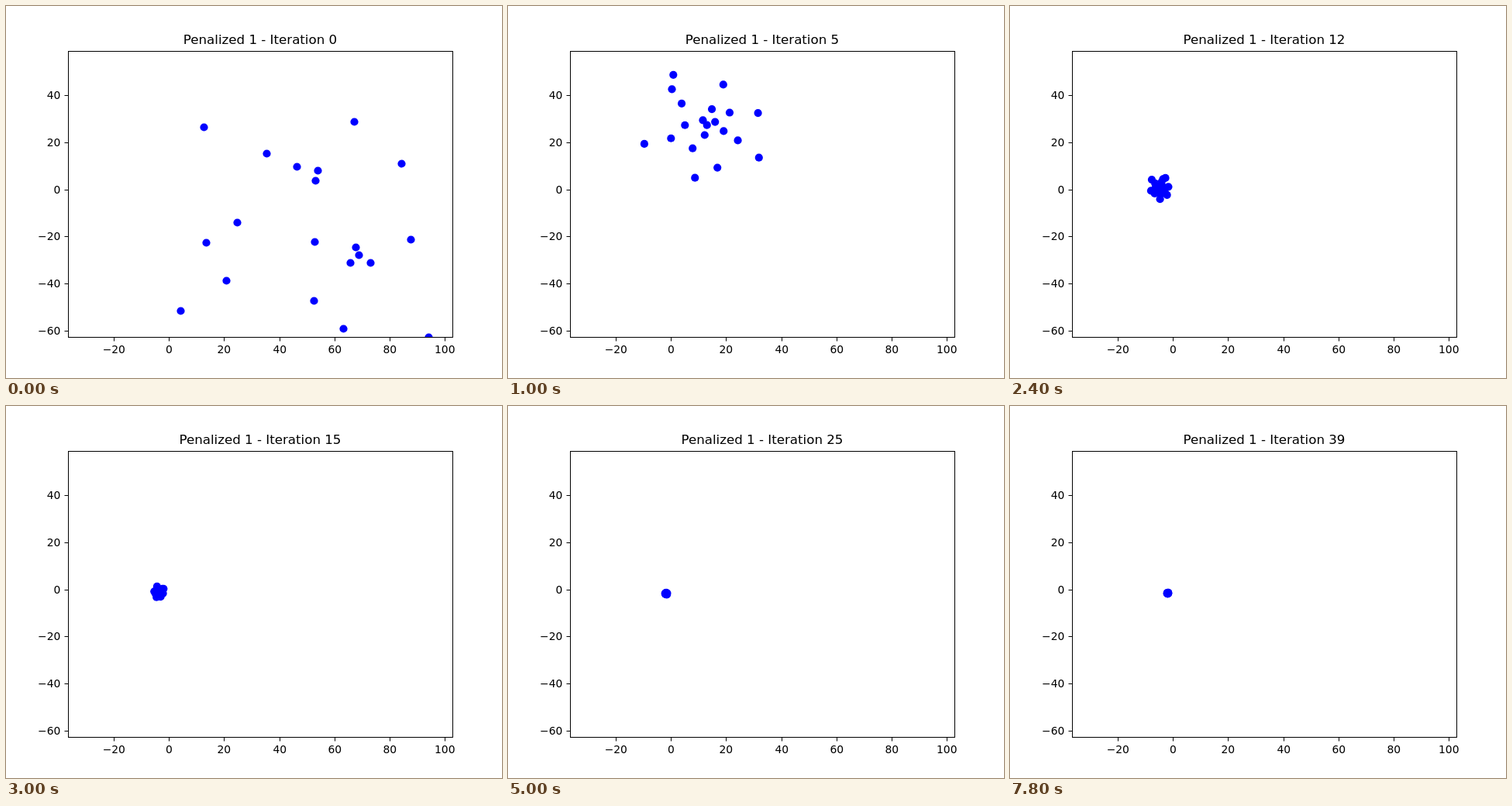
Animation, 640 px wide and 480 px high, one loop 8 s. Source, as an HTML page:

```html
<!DOCTYPE html>
<html lang="en">
<head>
<meta charset="utf-8">
<title>Swarm convergence</title>
<style>
  html, body { margin: 0; width: 100%; height: 100%; overflow: hidden; background: #fff; }
  svg { display: block; width: 640px; height: 480px; }
  text { font-family: "DejaVu Sans", sans-serif; font-size: 13.89px; }
  #title { font-size: 16.67px; text-anchor: middle; }
</style>
</head>
<body>
<svg viewBox="0 0 640 480">
  <clipPath id="area"><rect x="80" y="58" width="496" height="369"/></clipPath>
  <g id="dots" fill="#00f" clip-path="url(#area)"></g>
  <g id="axes" fill="none" stroke="#000"><rect x="80.5" y="58.5" width="496" height="369"/></g>
  <g id="labels"></g>
  <text id="title" x="328" y="49"></text>
</svg>
<script>
const STEP = 200, ITERATIONS = 40, GATHER = 5;

// Where the swarm starts.
const starts = [
  [255,156], [449,149], [336,190], [375,207], [402,212], [399,225], [510,203],
  [298,279], [258,305], [398,304], [451,311], [455,321], [444,331], [470,331],
  [522,301], [284,354], [397,380], [225,393], [435,416], [545,427]
];

// Path of the swarm's centre: iteration, x, y.
const path = [
  [0, 398, 280], [5, 256, 151], [9, 200, 209], [12, 194, 234], [19, 202.5, 241], [39, 203, 241]
];

const create = (parent, name, attrs) => {
  const node = document.createElementNS("http://www.w3.org/2000/svg", name);
  for (const key in attrs) node.setAttribute(key, attrs[key]);
  return document.getElementById(parent).appendChild(node);
};

const label = (value, x, y, anchor) => {
  create("labels", "text", { x, y, "text-anchor": anchor }).textContent =
    String(value).replace("-", "\u2212");
};

for (let value = -20; value <= 100; value += 20) {
  const x = Math.round(210.3 + value * 3.556);
  create("axes", "path", { d: `M${x + .5} 428v4.5` });
  label(value, x + .3, 448, "middle");
}
for (let value = -60; value <= 40; value += 20) {
  const y = Math.round(236.5 - value * 3.042);
  create("axes", "path", { d: `M75.5 ${y + .5}h5` });
  label(value, 70.3, y + 5, "end");
}

const random = seed => {
  const value = Math.sin(seed * 127.1 + 11.7) * 43758.5453;
  return value - Math.floor(value);
};

const dots = starts.map(([x, y], i) => ({
  circle: create("dots", "circle", { r: 5.1 }),
  startX: x - path[0][1],
  startY: y - path[0][2],
  angle: i * 2.4 + random(i),
  radius: (i + .5) / starts.length
}));
const title = document.getElementById("title");

function tangent(k, axis) {
  const before = path[Math.max(k - 1, 0)];
  const after = path[Math.min(k + 1, path.length - 1)];
  return (after[axis] - before[axis]) / (after[0] - before[0]);
}

// Cubic Hermite curve through the path points.
function centre(iteration, axis) {
  let k = path.length - 2;
  while (iteration < path[k][0]) k--;
  const span = path[k + 1][0] - path[k][0];
  const u = (iteration - path[k][0]) / span;
  const v = 1 - u;
  return v * v * (1 + 2 * u) * path[k][axis]
    + u * u * (1 + 2 * v) * path[k + 1][axis]
    + u * v * span * (v * tangent(k, axis) - u * tangent(k + 1, axis));
}

function draw(iteration) {
  title.textContent = `Penalized 1 - Iteration ${iteration}`;
  const x = centre(iteration, 1) + .5;
  const y = centre(iteration, 2) + .5;
  const gathered = Math.min(iteration / GATHER, 1);
  const spread = 1 + 86 * Math.exp(-.25 * Math.max(iteration - GATHER, 0));
  for (const dot of dots) {
    const angle = dot.angle + iteration * .15;
    const reach = dot.radius * spread * gathered;
    dot.circle.setAttribute("cx", x + dot.startX * (1 - gathered) + reach * Math.cos(angle));
    dot.circle.setAttribute("cy", y + dot.startY * (1 - gathered) + reach * Math.sin(angle));
  }
}

const begin = performance.now();
let shown = -1;
function tick() {
  const iteration = Math.floor((performance.now() - begin) / STEP) % ITERATIONS;
  if (iteration !== shown) draw(shown = iteration);
  requestAnimationFrame(tick);
}
tick();
</script>
</body>
</html>
```
